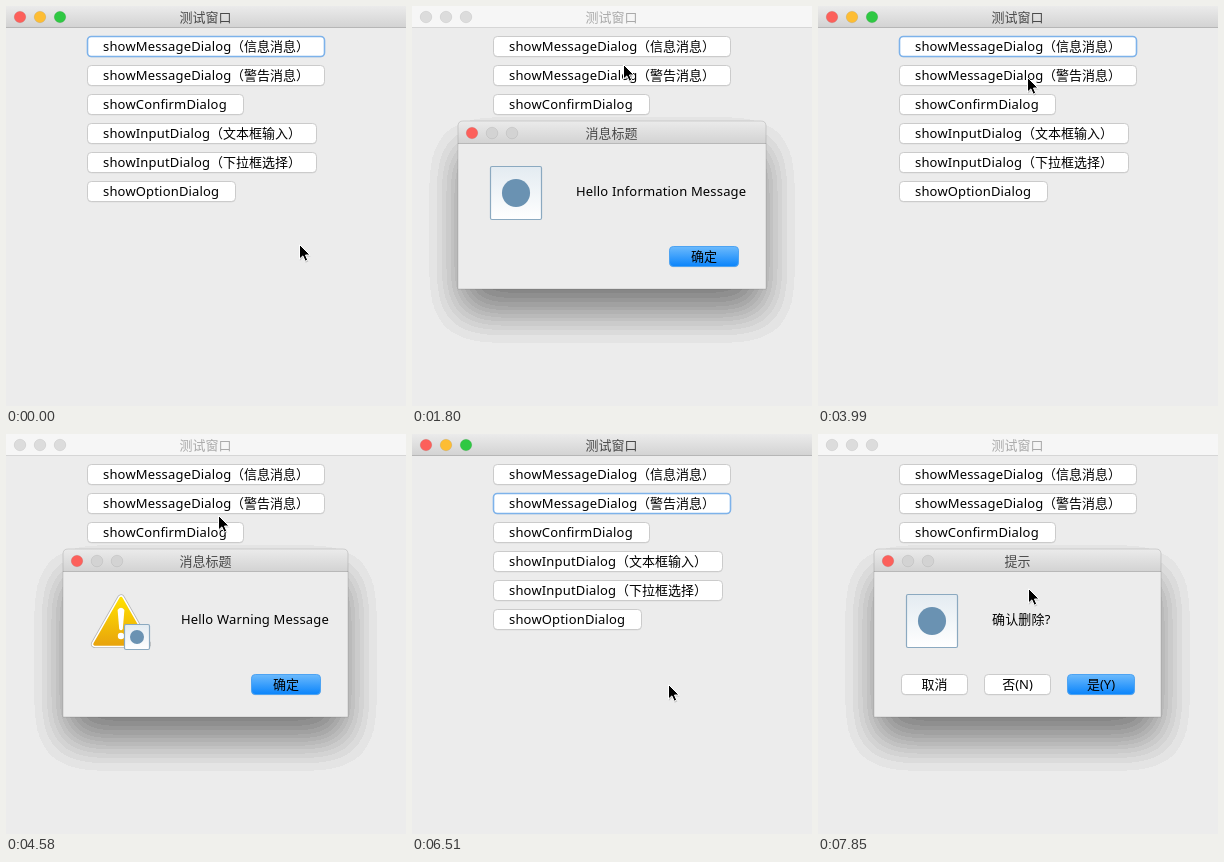
An HTML page that plays this animation: 400 by 400 pixels, repeating every 8 s.

```html
<!DOCTYPE html>
<html lang="zh">
<head>
<meta charset="utf-8">
<style>
html, body { margin: 0; width: 100%; height: 100%; overflow: hidden; background: #ececec; }
svg { display: block; width: 100vw; height: 100vh; }
text { font: 13px "Noto Sans", "Noto Sans CJK SC", "Noto Sans CJK", sans-serif; white-space: pre; }
.lat { letter-spacing: .17px; }
.mid { text-anchor: middle; }
</style>
</head>
<body>
<svg id="stage" viewBox="0 0 400 400" xmlns="http://www.w3.org/2000/svg"></svg>
<script>
const LOOP = 8000;
const stage = document.getElementById('stage');

const grad = (id, top, bottom) =>
  `<linearGradient id="${id}" x2="0" y2="1"><stop stop-color="${top}"/><stop offset="1" stop-color="${bottom}"/></linearGradient>`;

// Button looks: [fill, stroke, stroke width]
const LOOKS = {
  plain: ['#fff', '#cbcbcb', 1],
  focus: ['#fff', '#7db2ea', 1.6],
  ready: ['url(#ready)', '#4da3f2', 1],
  press: ['url(#press)', '#4c9df0', 1]
};

const rows = [
  ['showMessageDialog', '（信息消息）', 238],
  ['showMessageDialog', '（警告消息）', 238],
  ['showConfirmDialog', '', 157],
  ['showInputDialog', '（文本框输入）', 230],
  ['showInputDialog', '（下拉框选择）', 230],
  ['showOptionDialog', '', 149]
];

// open/close/press times, left, right, title, message, message x, icon, buttons [x, width, label]
const dialogs = [
  { open: 1500, close: 3120, press: 2820, x: 46, r: 354, title: '消息标题',
    msg: 'Hello Information Message', mx: 164, icon: panel(78, 160, 52, 54),
    buttons: [[257, 70, '确定']] },
  { open: 4290, close: 6370, press: 5920, x: 57, r: 342, title: '消息标题',
    msg: 'Hello Warning Message', mx: 175, icon: warning() + panel(118, 190, 26, 26),
    buttons: [[245, 70, '确定']] },
  { open: 7550, close: LOOP, press: LOOP, x: 56, r: 343, title: '提示',
    msg: '确认删除?', mx: 174, icon: panel(88, 160, 52, 54),
    buttons: [[249, 68, '是(Y)'], [166, 67, '否(N)'], [83, 67, '取消']] }
];

// Pointer moves: first step, last step, step count, x, y
const moves = [
  [300, 1050, 6, 205, 42],
  [1800, 2530, 6, 285, 252],
  [3270, 3990, 6, 209, 71],
  [4440, 5330, 7, 260, 254],
  [5470, 5620, 2, 256, 250],
  [6520, 7100, 5, 190, 91],
  [7700, 7850, 2, 210, 154]
];

const pressAt = [1200, 4140, 7250];

function button(x, y, w, look, label) {
  const [fill, stroke, sw] = LOOKS[look];
  return `<g><rect x="${x + .5}" y="${y + 1.3}" width="${w - 1}" height="20" rx="4" fill="#000" opacity=".13"/>
    <rect class="face" x="${x + .5}" y="${y + .5}" width="${w - 1}" height="20" rx="3.8"
      fill="${fill}" stroke="${stroke}" stroke-width="${sw}"/>${label}</g>`;
}

function setLook(face, look) {
  const [fill, stroke, sw] = LOOKS[look];
  face.setAttribute('fill', fill);
  face.setAttribute('stroke', stroke);
  face.setAttribute('stroke-width', sw);
}

function lights(x, y, colors) {
  return colors.map((c, i) =>
    `<circle cx="${x + i * 20}" cy="${y}" r="5.8" fill="${c}" stroke="#000" stroke-opacity=".09" stroke-width=".8"/>`).join('');
}

function panel(x, y, w, h) {
  return `<rect x="${x + .5}" y="${y + .5}" width="${w - 1}" height="${h - 1}" rx="1.5" fill="url(#panel)" stroke="#8ba9c0" stroke-width="1.2"/>
    <circle cx="${x + w / 2}" cy="${y + h / 2}" r="${w * .27}" fill="#6a92b2"/>`;
}

function warning() {
  const tri = 'M115 164.5L89 210H141Z';
  return `<g stroke-linejoin="round"><path d="${tri}" fill="#aaa" stroke="#b5b5b5" stroke-width="8"/>
    <path d="${tri}" fill="#fff" stroke="#fff" stroke-width="6.5"/>
    <path d="${tri}" fill="url(#amber)" stroke="url(#amber)" stroke-width="3.5"/></g>
    <path d="M111.6 176Q115 171.5 118.4 176L116.8 195Q115 197.5 113.2 195Z" fill="#fff"/>
    <circle cx="115" cy="202" r="3.2" fill="#fff"/>`;
}

function dialog(d) {
  const w = d.r - d.x;
  const [x, r] = [d.x, d.r];
  return `<g class="dialog" visibility="hidden">
    <rect x="${x}" y="140" width="${w}" height="168" filter="url(#shade)"/>
    <path d="M${x} 283V120Q${x} 115 ${x + 5} 115H${r - 5}Q${r} 115 ${r} 120V283Z" fill="#ececec"/>
    <path d="M${x} 138V120Q${x} 115 ${x + 5} 115H${r - 5}Q${r} 115 ${r} 120V138Z" fill="url(#bar)"/>
    <path d="M${x} 137.5H${r}" stroke="#b8b8b8"/>
    <path d="M${x} 283V120Q${x} 115 ${x + 5} 115H${r - 5}Q${r} 115 ${r} 120V283Z" fill="none" stroke="#000" stroke-opacity=".18" stroke-width=".7"/>
    ${lights(x + 14, 127, ['#fc605b', '#d3d3d3', '#d3d3d3'])}
    <text class="mid" x="199.5" y="132" fill="#484848">${d.title}</text>
    ${d.icon}<text class="lat" x="${d.mx}" y="190">${d.msg}</text>
    ${d.buttons.map(([bx, bw, label], i) => button(bx, 240, bw, i ? 'plain' : 'ready',
      `<text class="mid" x="${bx + bw / 2}" y="255">${label}</text>`)).join('')}
  </g>`;
}

const LEVELS = 14;
const shades = Array.from({ length: LEVELS }, (_, k) => (k * .5 / LEVELS).toFixed(3)).join(' ');

stage.innerHTML = `<defs>
  ${grad('bar', '#ebebeb', '#d2d2d2')}${grad('ready', '#6cbafc', '#0a84fb')}
  ${grad('press', '#3d9dff', '#0062ec')}${grad('panel', '#e3ebf1', '#ffffff')}${grad('amber', '#ffe000', '#e9a50c')}
  <filter id="shade" filterUnits="userSpaceOnUse" x="-60" y="40" width="520" height="360" color-interpolation-filters="sRGB">
    <feGaussianBlur stdDeviation="21"/>
    <feComponentTransfer><feFuncA type="discrete" tableValues="${shades}"/></feComponentTransfer>
  </filter></defs>
  <rect width="400" height="400" fill="#ececec"/>
  <g id="active"><rect width="400" height="22" fill="url(#bar)"/><path d="M0 21.5H400" stroke="#b6b6b6"/>
    ${lights(14, 11, ['#fc605b', '#fdbd34', '#2fc843'])}<text class="mid" x="199.5" y="16" fill="#484848">测试窗口</text></g>
  <g id="idle"><rect width="400" height="22" fill="#f6f6f6"/><path d="M0 21.5H400" stroke="#d6d6d6"/>
    ${lights(14, 11, ['#dcdcdc', '#dcdcdc', '#dcdcdc'])}<text class="mid" x="199.5" y="16" fill="#a9a9a9">测试窗口</text></g>
  <g id="rows">${rows.map(([name, note, w], i) => {
    const y = 30 + i * 29;
    return button(81, y, w, 'plain', `<text class="lat" x="97" y="${y + 15}">${name}</text>
      <text x="${65 + w - note.length * 13 + 0}" y="${y + 15}">${note}</text>`);
  }).join('')}</g>
  ${dialogs.map(dialog).join('')}
  <g id="pointer"><path d="M.5 1.5V16L4 12.8L6.3 18L9 16.8L6.8 11.8H11.3Z" fill="#000" opacity=".16" transform="translate(.4 .8)"/>
    <path d="M.5 .5V15L3.9 11.9L6.2 17.2L8.7 16.1L6.5 11H11Z" fill="#000" stroke="#fff" stroke-width="1"/></g>`;

const faces = [...document.querySelectorAll('#rows .face')];
const boxes = [...document.querySelectorAll('.dialog')];
const defaults = boxes.map(b => b.querySelector('.face'));
const pointer = document.getElementById('pointer');
const show = (el, on) => el.setAttribute('visibility', on ? 'visible' : 'hidden');
const ease = p => p * p * (3 - 2 * p);

function pointerAt(t) {
  let x = 293, y = 238;
  for (const [t0, t1, n, tx, ty] of moves) {
    if (t < t0) break;
    const step = Math.min(n, Math.floor((t - t0) / (t1 - t0) * (n - 1) + .001) + 1);
    const p = ease(step / n);
    x += (tx - x) * p;
    y += (ty - y) * p;
  }
  return [Math.round(x), Math.round(y)];
}

function render(t) {
  const open = dialogs.findIndex(d => t >= d.open && t < d.close);
  const clicked = pressAt.filter(p => t >= p).length - 1;
  show(document.getElementById('active'), open < 0);
  show(document.getElementById('idle'), open >= 0);
  faces.forEach((face, i) => {
    const held = i === clicked && t < dialogs[i].open;
    const focused = open < 0 && i === Math.max(0, clicked);
    setLook(face, held ? 'press' : focused ? 'focus' : 'plain');
  });
  boxes.forEach((box, i) => {
    show(box, i === open);
    setLook(defaults[i], t >= dialogs[i].press ? 'press' : 'ready');
  });
  pointer.setAttribute('transform', `translate(${pointerAt(t)})`);
}

function tick() {
  render(performance.now() % LOOP);
  requestAnimationFrame(tick);
}
tick();
</script>
</body>
</html>
```
